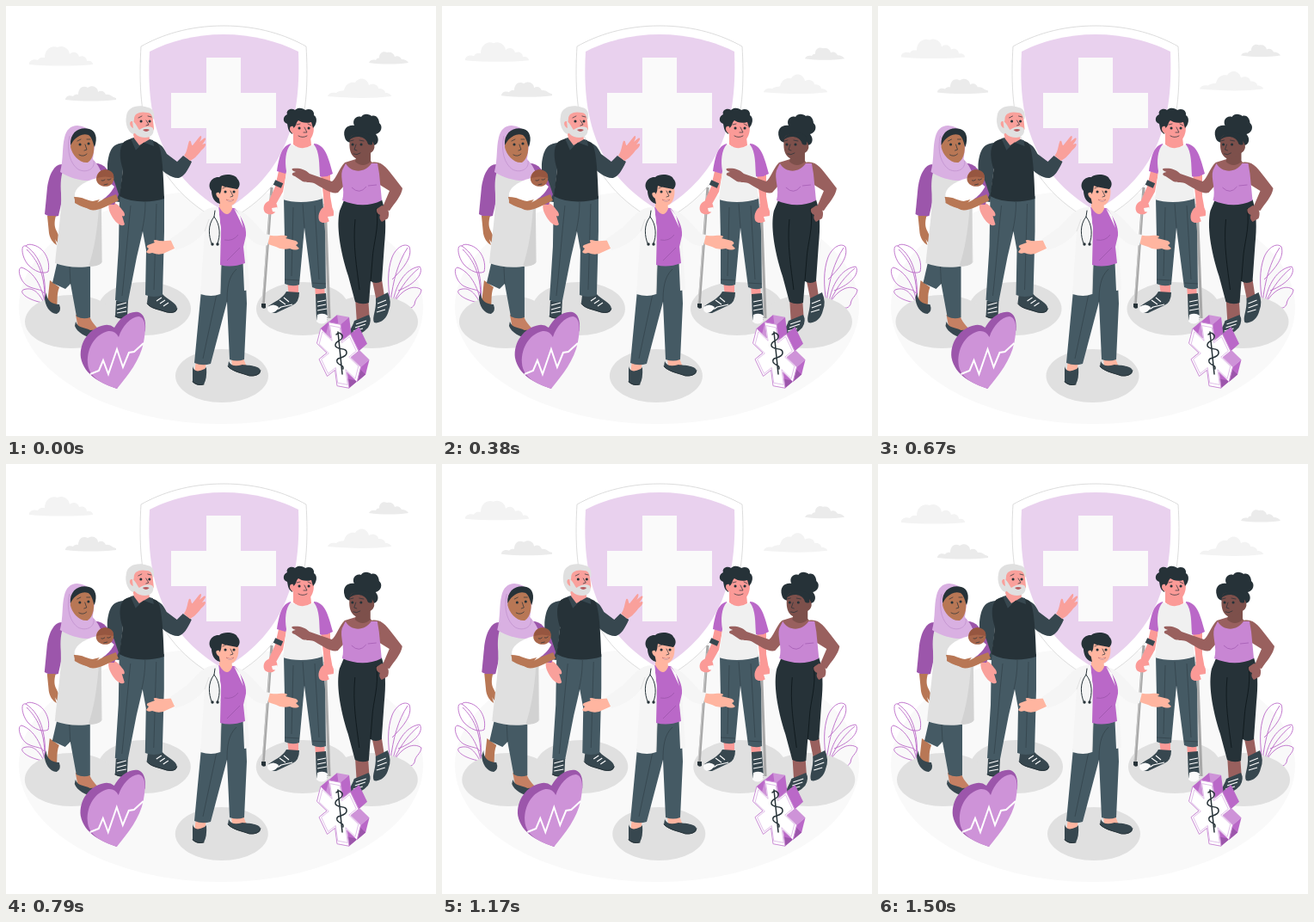
Recreate the animation shown at these times as an HTML page. Size 500 by 500 pixels, loop 1540 ms.

```html
<!DOCTYPE html>
<html lang="en">
<head>
<meta charset="utf-8">
<title>Health care for everyone</title>
<style>
html, body { margin: 0; width: 100%; height: 100%; overflow: hidden; background: #fff; }
svg { display: block; width: 100vw; height: 100vh; }
.k { fill: #263238; }
.s { fill: #455a64; }
.d { fill: #37474f; }
.p { fill: #ba68c8; }
.l { fill: #c886d3; }
.v { fill: #9c56ab; }
.w { fill: #fafafa; }
.g { fill: #e0e0e0; }
.brown { fill: #b87755; }
.tan { fill: #c58063; }
.pink { fill: #f9a09b; }
.rose { fill: #fb9a97; }
.peach { fill: #ffb5a0; }
.deep { fill: #7d504b; }
.mauve { fill: #99605e; }
.ln { fill: none; stroke: #263238; stroke-width: 1; stroke-linecap: round; stroke-linejoin: round; }
.thin { stroke-width: .7; }
.eye { stroke-width: 3; }
.fold { fill: none; stroke: #263238; stroke-width: .8; opacity: .55; }
.lace { fill: none; stroke: #fff; stroke-width: 1.1; }
.leaf { fill: none; stroke: #ba68c8; stroke-width: .9; }
</style>
</head>
<body>
<svg viewBox="0 0 500 500">
  <ellipse cx="250" cy="350" rx="235" ry="136" fill="#f9f9f9"/>
  <g id="clouds">
    <g fill="#f3f3f3">
      <path d="M27 68C26 64 32 61 37 63C39 59 43 60 45 60C45 50 53 45 60 48C66 45 73 49 74 56C78 52 84 54 85 59C90 57 94 60 94 64C98 63 101 65 101 68C80 70 50 70 27 68Z"/>
      <path d="M374 105C375 101 380 100 384 101C387 98 392 99 393 98C395 90 401 88 406 89C410 82 420 83 422 92C427 89 433 92 433 96C438 96 441 98 441 101C445 101 448 103 448 105C425 108 397 107 374 105Z"/>
    </g>
    <g fill="#ebebeb">
      <path d="M69 109C69 105 74 103 78 105C80 102 84 103 84 103C84 95 90 92 95 95C101 91 107 95 107 100C111 97 115 100 116 103C121 102 123 106 128 107V109C109 111 88 111 69 109Z"/>
      <path d="M422 66C423 63 427 62 430 63C431 60 434 61 434 60C434 54 439 52 443 54C448 53 451 55 452 59C456 57 459 60 460 62C464 62 467 64 468 66C453 68 437 68 422 66Z"/>
    </g>
  </g>
  <path d="M253 23C212 23 180 34 157 47C153 115 157 205 253 252C349 205 353 115 349 47C326 34 294 23 253 23Z" fill="#fff" stroke="#d8d8d8" stroke-width=".9"/>
  <path d="M253 33C220 33 190 41 167 53C164 110 168 190 253 238C338 190 342 110 340 53C316 41 286 33 253 33Z" fill="#e9d1ee"/>
  <path class="w" d="M233 60H273V101H314V142H273V183H233V142H192V101H233Z"/>

  <g class="leaf">
    <path d="M45 345C47 320 43 292 23 279C16 277 19 293 25 300C33 309 43 312 49 309C52 295 44 281 32 278Q26 276 23 279M45 345C42 327 33 309 18 304C12 305 17 322 26 326C34 330 42 329 44 334M44 345C38 333 31 326 20 330C15 333 25 342 43 345M24 283C36 295 45 310 45 340"/>
    <path d="M447 346C444 325 443 308 449 292C454 280 464 275 469 280C473 292 462 305 449 318M447 346C450 318 456 298 467 281M450 344C453 325 464 305 481 303C486 310 477 323 456 331M451 344C460 325 469 314 480 305M452 344C460 330 474 323 483 330C482 338 476 338 475 347C472 353 466 352 463 347"/>
  </g>

  <g class="shake g">
    <ellipse cx="161" cy="352" rx="54" ry="31"/>
    <ellipse cx="76" cy="367" rx="54" ry="31"/>
    <ellipse cx="345" cy="352" rx="54" ry="31"/>
    <ellipse cx="425" cy="367" rx="54" ry="31"/>
    <ellipse cx="251" cy="430" rx="54" ry="31"/>
  </g>

  <!-- older man -->
  <g class="shake">
    <path class="d" d="M128 343L142 342L141 361Q134 366 127 361ZM165 337L182 335C187 341 199 345 199 352Q198 359 186 356C177 353 165 351 164 345Z"/>
    <path class="ln" d="M127 361Q134 365 141 361M164 346C168 352 179 353 187 356Q197 358 199 352"/>
    <path class="lace" d="M129 348L140 345M129 353L140 350M129 357L140 355M175 343L181 339M179 346L185 342M183 349L189 345"/>
    <path class="s" d="M132 219L184 221L184 262L182 336Q172 340 162 336L163 284L159 262L152 292L142 343Q135 346 127 342L131 280Z"/>
    <path class="fold" d="M162 228C162 242 160 253 158 262M145 232C141 270 139 300 135 337M175 230C174 260 173 300 172 330"/>
    <path class="d" d="M137 159C124 160 120 167 118 184L118 226L132 228L136 190ZM174 159C181 161 183 164 187 172L199 181L206 174L216 181C211 192 207 198 201 200C193 201 183 193 179 188Z"/>
    <path class="pink" d="M120 229C125 226 132 232 135 237C139 241 139 246 135 244L138 254C134 258 127 251 124 246C121 241 118 235 120 229ZM207 174C211 169 211 162 213 157C216 155 215 162 217 162L225 152C228 149 228 154 225 158L230 154C234 152 232 157 228 161L231 160C234 160 231 165 227 168C222 175 218 178 214 180Z"/>
    <path class="k" d="M137 158C147 151 165 153 176 159C181 164 183 190 184 224C169 229 146 229 132 221L136 190C132 178 131 165 137 158Z"/>
    <path class="d" d="M145 154L153 152L171 156L172 163L160 159L151 168Z"/>
    <path class="pink" d="M147 144L166 148L167 155L155 162L149 154Z"/>
    <path class="g" d="M140 128C141 117 154 114 165 118C171 119 173 124 172 131L148 149C142 147 138 137 140 128Z"/>
    <path class="pink" d="M149 131C149 125 156 122 164 124C170 124 171 129 172 143C170 150 157 153 150 147C146 139 149 135 149 131Z"/>
    <path class="g" d="M146 134C150 134 152 140 155 144C160 140 168 139 171 142C173 148 169 153 162 153C153 153 146 148 146 134Z"/>
    <path d="M159 144Q163 142 167 144Q163 148 159 144Z" fill="#b75c60"/>
    <path class="ln eye" d="M157 134h.1M167 134h.1"/>
    <path class="ln thin" d="M163 133L166 138L163 139M154 130L158 128M165 128L169 129M151 168L160 159L170 163"/>
    <path class="pink" d="M147 134C143 133 143 140 148 142Z"/>
  </g>

  <!-- woman with baby -->
  <g class="shake">
    <path class="brown" d="M51 319L62 327C58 336 61 347 58 352L48 346Z"/>
    <path class="d" d="M47 333C47 342 53 347 62 347Q65 355 59 358C51 358 45 348 45 339Z"/>
    <path class="tan" d="M81 359L97 358C97 367 106 372 109 379L102 385L84 375Z"/>
    <path class="d" d="M81 367C84 375 91 373 98 377Q104 376 108 380Q110 385 102 386C94 386 82 379 80 372Z"/>
    <path class="s" d="M60 296L98 299L98 362Q90 365 82 361L75 323L69 329L54 322Z"/>
    <path class="fold" d="M75 323L74 303"/>
    <path class="v" d="M65 184C56 184 50 196 48 211L45 242Q52 247 61 244L68 213Z"/>
    <path class="brown" d="M48 244L58 244C56 251 56 257 59 262L65 275C63 279 59 275 57 271L59 278C54 275 51 270 50 264Z"/>
    <path class="v" d="M101 183C113 181 120 191 126 204L131 219L126 231Q115 231 106 225Z"/>
    <path class="g" d="M67 190L104 189C110 199 113 219 111 240L112 298C97 306 73 305 57 299C60 267 65 239 64 218C63 206 64 196 67 190Z"/>
    <path d="M108 236C106 260 103 282 96 303Q107 303 111 299L111 236Z" fill="#d2d2d2"/>
    <path d="M83 139C97 140 104 149 103 163L101 178C108 185 111 193 113 200C99 206 78 203 63 193C67 177 65 165 68 153C70 144 75 139 83 139Z" fill="#d9b0e2"/>
    <path d="M74 151C70 169 75 184 84 190C94 195 104 189 102 180" fill="none" stroke="#c596d1" stroke-width=".9"/>
    <path class="brown" d="M76 153C82 145 96 146 101 154C104 165 102 178 95 182C85 183 77 173 75 164Z"/>
    <path class="k" d="M75 162C74 146 86 140 97 143C104 145 107 153 103 164C101 160 101 154 96 150C89 148 85 151 81 154C78 156 77 159 75 162Z"/>
    <path class="ln eye" d="M86 161h.1M96 160h.1"/>
    <path class="ln thin" d="M83 157L87 155M94 155L98 155M92 161L94 167L91 168M85 173Q90 176 94 172"/>
    <path class="brown" d="M79 222C87 221 93 228 99 230L128 219L131 226C117 233 106 239 98 237L81 229Z"/>
    <path d="M80 218C82 209 94 203 106 200Q119 203 126 210C121 220 108 231 96 230C86 228 79 226 80 218Z" fill="#fff"/>
    <path d="M105 200C106 192 114 188 120 192C126 194 127 202 123 207C117 213 104 209 105 200Z" fill="#a9674c"/>
    <path d="M106 198C108 190 117 188 123 193Q126 196 125 200Q115 197 106 200Z" fill="#965640"/>
    <path class="ln thin" d="M111 203Q113 204 115 202M118 202Q120 203 122 201M114 208L118 207"/>
    <path class="brown" d="M80 222C90 222 93 226 101 227L109 225L104 231L109 231L102 236Q91 236 80 229Z"/>
  </g>

  <!-- man with crutches -->
  <g>
    <path d="M309 211L299 349M371 230L376 363" stroke="#a8a8a8" stroke-width="3.2"/>
    <path d="M308 220L298 345M370 245L374 361" stroke="#d0d0d0" stroke-width=".8"/>
    <path class="k" d="M297 346L302 346L302 351Q299 353 297 350Z"/>
    <path class="rose" d="M327 320L340 320L340 337L329 337ZM359 324L370 324L371 339L360 339Z"/>
    <path class="d" d="M326 332L341 333Q341 345 333 348L314 357Q303 357 305 349C312 344 322 340 326 332ZM360 335L372 334L374 364Q368 372 361 365Z"/>
    <path class="lace" d="M305 350C310 354 317 353 320 350L333 347M318 342L325 347M323 339L329 344M362 344L372 342M362 349L372 347M362 354L373 352M362 365Q369 361 374 364"/>
    <path class="w" d="M304 350Q311 345 317 350Q315 356 308 357Q303 355 304 350ZM362 359Q369 356 374 360L373 367Q367 372 361 367Z"/>
    <path class="s" d="M323 223L368 222L371 262L372 328Q365 331 356 327L347 258L341 324Q333 327 324 323L324 270Z"/>
    <path class="fold" d="M345 230L347 258M334 234L332 314M359 232L364 318M324 318L341 319M356 322L372 323"/>
    <path class="rose" d="M317 192L326 194L322 216L313 232L305 228L313 210ZM366 195L377 194L377 221L380 238L370 238L369 220Z"/>
    <path class="rose" d="M305 227C312 226 317 230 315 236C313 243 306 244 301 240C298 235 300 229 305 227ZM371 233C378 231 382 236 381 243C379 252 367 255 364 249C362 242 366 235 371 233Z"/>
    <path class="w" d="M309 235L315 234L315 240L310 239ZM374 245L381 244L380 250L376 251Z"/>
    <path d="M312 205L321 209" stroke="#37474f" stroke-width="6"/>
    <path class="p" d="M331 160C321 163 318 173 315 192L325 195L335 180ZM358 160C370 161 374 172 380 195Q372 200 364 198L357 180Z"/>
    <path d="M331 161Q347 168 358 161C365 170 364 184 365 197L368 224C354 229 334 229 322 225L326 192C324 180 325 168 331 161Z" fill="#f0f0f0"/>
    <path class="rose" d="M334 144L354 152L355 162Q344 169 334 161Z"/>
    <path class="rose" d="M332 137C333 129 352 126 357 135C360 147 355 158 347 158C338 157 331 148 332 137Z"/>
    <path class="k" d="M333 149C328 146 328 142 327 137C321 135 322 128 327 126C325 121 332 118 336 121C340 117 346 119 348 121C354 118 359 122 358 127C363 130 361 138 357 142L355 135C348 137 343 135 340 133C337 135 338 140 334 142Z"/>
    <path class="rose" d="M334 140C329 138 328 146 335 149Z"/>
    <path class="ln eye" d="M341 142h.1M352 142h.1"/>
    <path class="ln thin" d="M338 138L342 137M351 137L355 139M347 141L350 147L346 147M340 151Q345 154 350 151"/>
  </g>

  <!-- woman in tank top -->
  <g class="shake">
    <path class="mauve" d="M406 338L421 338L423 367L408 370ZM425 315L437 318L441 344L431 344Z"/>
    <path class="d" d="M405 366L422 359Q426 366 421 374Q412 384 401 383C397 378 403 374 405 366ZM430 340L444 333Q449 344 445 354C443 364 434 370 428 368C425 362 431 354 430 340Z"/>
    <path class="lace" d="M407 370L419 366M406 374L418 370M404 378L415 375M432 346L442 342M432 351L443 347M431 356L441 353"/>
    <path class="k" d="M393 226L437 225C442 240 442 258 440 277L437 320Q430 324 424 320L422 345Q414 348 406 344L398 314C388 283 384 255 388 238Z"/>
    <path d="M431 235C434 260 427 275 426 295L424 320M406 248C403 278 408 304 411 330" fill="none" stroke="#111b1f" stroke-width="1"/>
    <path class="mauve" d="M394 182C387 189 384 201 379 204L353 195C347 189 340 188 333 189Q331 191 337 193C331 194 332 197 336 198L345 204C350 206 355 204 360 207C370 213 379 219 386 217L400 201ZM425 182C437 179 444 190 451 199L461 212C460 221 451 230 446 238L437 236L446 215L430 205Z"/>
    <path class="mauve" d="M437 232C444 233 447 240 444 247L437 251Q433 247 435 243Q430 241 431 236Z"/>
    <path class="mauve" d="M394 182L407 178L424 180L430 187L412 200L394 193Z"/>
    <path class="l" d="M395 183C401 194 417 195 425 183L432 183L434 195L437 226C421 234 405 232 391 226C395 213 388 201 391 191Z"/>
    <path d="M402 211Q411 220 419 210M421 209L431 208" fill="none" stroke="#a55db4" stroke-width=".8"/>
    <path class="deep" d="M409 168L424 169L424 181Q415 189 406 181Z"/>
    <path class="k" d="M394 153C391 143 397 138 405 139C402 133 407 127 413 129C416 124 423 126 425 128C431 126 434 132 434 136C439 140 436 148 430 149C436 156 431 163 426 162L417 164L401 159Q395 158 394 153Z"/>
    <path class="deep" d="M400 154C403 147 416 147 423 152L428 161C430 167 425 171 421 172C417 178 408 181 403 174C399 169 399 161 400 154Z"/>
    <path class="k" d="M399 156C403 144 421 146 426 152L426 161Q421 163 420 158C416 151 406 150 399 156Z"/>
    <path class="ln eye" d="M403 161h.1M413 161h.1"/>
    <path class="ln thin" d="M400 157L404 156M411 156L416 157M407 161L405 167L408 168M404 172Q408 174 412 171"/>
  </g>

  <!-- heart -->
  <g class="shake">
    <path class="v" d="M129 445C112 439 91 430 87 409C85 391 97 374 115 371Q121 370 126 374C132 363 143 354 154 356C160 358 163 365 162 377Z"/>
    <path d="M129 445C114 440 96 433 95 415C94 396 105 381 119 378Q127 377 131 385C135 372 145 362 154 361C163 362 163 376 160 391C156 412 142 429 129 445Z" fill="#ce93d8"/>
    <path d="M98 428L108 424L113 412L119 428L129 399L136 420L143 403L149 402L160 392" fill="none" stroke="#fff" stroke-width="2"/>
  </g>

  <!-- doctor -->
  <g>
    <path class="peach" d="M196 272C188 273 181 274 174 272Q170 272 173 275L165 278Q162 280 166 282L163 286Q165 289 170 287Q179 291 187 286L198 281ZM305 266C313 269 319 266 325 267Q329 268 325 270L337 273Q342 276 337 278L341 282Q337 285 330 282Q320 284 314 280L305 277Z"/>
    <path class="peach" d="M221 412L233 413L231 427L219 427ZM262 408L275 407L280 420L263 420Z"/>
    <path class="d" d="M217 419Q219 428 231 422L233 420Q234 433 230 440Q222 443 217 437ZM259 413Q262 421 275 417C282 418 295 418 296 424Q296 431 283 430C274 427 262 425 258 419Z"/>
    <path class="ln" d="M217 437Q223 442 230 440M258 419C263 425 275 427 283 430Q294 431 296 424"/>
    <path class="s" d="M228 320L250 299L278 298L280 346L277 411Q269 414 260 411L257 344L238 416Q228 419 219 415Z"/>
    <path class="fold" d="M268 306C258 315 257 330 257 344M246 330L229 410"/>
    <path d="M246 234C230 233 222 246 211 257L191 271L197 284C212 280 225 271 231 262L226 335Q239 339 249 335L252 250ZM267 236C281 240 292 256 301 265L307 266L304 278C296 281 287 275 279 266L283 330L277 331L274 265Z" fill="#f5f5f5"/>
    <path d="M231 262L236 248M249 335L251 270" fill="none" stroke="#dcdcdc" stroke-width=".8"/>
    <path class="p" d="M247 234L266 235C274 246 280 256 279 267L276 280L278 299Q262 305 249 301L250 260Z"/>
    <path class="w" d="M247 233L250 262L240 247ZM265 235L276 258L272 243Z"/>
    <path d="M254 272Q264 274 270 266M257 296L272 281" fill="none" stroke="#9c56ab" stroke-width=".8"/>
    <path class="peach" d="M248 220L262 226L263 236Q257 249 248 234Z"/>
    <path class="peach" d="M245 212C247 202 265 201 270 211C272 223 267 232 260 232C250 231 245 222 245 212Z"/>
    <path class="k" d="M249 230C240 228 239 218 239 215C233 208 239 198 248 199C254 194 267 196 269 201C273 205 272 210 269 213C262 212 254 210 251 209C250 213 251 217 247 220Z"/>
    <path class="peach" d="M248 217C242 215 244 223 249 224Z"/>
    <path class="ln eye" d="M255 216h.1M265 216h.1"/>
    <path class="ln thin" d="M252 212L256 210M264 210L268 212M261 215L264 221L261 222"/>
    <path d="M256 225Q261 228 265 225Q261 230 256 225Z" fill="#fff" stroke="#b75c60" stroke-width=".5"/>
    <path class="ln" d="M243 238L242 245C234 255 236 268 239 276M242 245C250 255 249 268 246 276"/>
    <circle class="k" cx="240" cy="277" r="1.7"/><circle class="k" cx="246" cy="277" r="1.7"/>
  </g>

  <g id="star"></g>
</svg>
<script>
const LOOP = 1540, CYCLE = 1500;
const SWAY = [0, -1, 2, -4, 4, -4, 4, -4, 2, -1, 0], SCALE = .68;
const clouds = document.getElementById('clouds');
const shaken = document.querySelectorAll('.shake');

// six-armed emblem in slanted axes
function starPoints(cx, cy, size, half) {
  const at = (r, a) => {
    const x = r * Math.cos(a) * size, y = r * Math.sin(a) * size;
    return [cx + 24 * x - 5 * y, cy + 4.5 * x - 37 * y];
  };
  const rim = Math.hypot(1, half), spread = Math.atan(half);
  const pts = [];
  for (let i = 0; i < 6; i++) {
    const a = Math.PI / 6 + i * Math.PI / 3;
    pts.push(at(rim, a - spread), at(rim, a + spread), at(2 * half, a + Math.PI / 6));
  }
  return pts;
}

function drawStar() {
  const poly = (pts, style) =>
    `<polygon points="${pts.map(p => p.map(n => n.toFixed(1))).join(' ')}" ${style}/>`;
  const [dx, dy] = [10, -8.5];
  const front = starPoints(387, 406, 1, .29);
  const sides = front.map((a, i) => {
    const b = front[(i + 1) % front.length];
    const nx = a[1] - b[1], ny = b[0] - a[0];
    const lit = -ny / Math.hypot(nx, ny);
    const fill = lit > .6 ? '#ce93d8' : lit > -.3 ? '#ba68c8' : '#9c56ab';
    const depth = (a[0] + b[0]) * dx + (a[1] + b[1]) * dy;
    return { depth, art: poly([a, b, [b[0] + dx, b[1] + dy], [a[0] + dx, a[1] + dy]], `fill="${fill}"`) };
  });
  sides.sort((a, b) => b.depth - a.depth);
  document.getElementById('star').innerHTML = sides.map(s => s.art).join('')
    + poly(front, 'fill="#fff" stroke="#ce93d8" stroke-width="1"')
    + poly(starPoints(387, 406, .9, .27), 'fill="none" stroke="#d9b0e2" stroke-width=".8"')
    + '<path class="ln" style="stroke-width:1.5" d="M386 379L391 428M384 382Q388 378 391 383C393 390 382 388 383 395C385 401 397 396 396 404C394 411 383 407 385 414C387 419 393 416 392 422"/>';
}

// cubic-bezier(.25, .1, .25, 1)
function ease(x) {
  let lo = 0, hi = 1, u = .5;
  for (let i = 0; i < 18; i++) {
    u = (lo + hi) / 2;
    const bx = .75 * u * (1 - u) + u ** 3;
    if (bx < x) lo = u; else hi = u;
  }
  return .3 * u * (1 - u) ** 2 + 3 * u * u * (1 - u) + u ** 3;
}

function render(ms) {
  const p = (ms % LOOP % CYCLE) / CYCLE;
  const i = Math.floor(p * 10);
  const dx = SCALE * (SWAY[i] + (SWAY[i + 1] - SWAY[i]) * ease(p * 10 - i));
  for (const el of shaken) el.setAttribute('transform', `translate(${dx.toFixed(2)} 0)`);
  const lift = -9.5 * (1 - Math.abs(2 * p - 1));
  clouds.setAttribute('transform', `translate(0 ${lift.toFixed(2)})`);
}

drawStar();
const start = performance.now();
function tick() {
  render(performance.now() - start);
  requestAnimationFrame(tick);
}
tick();
</script>
</body>
</html>
```
